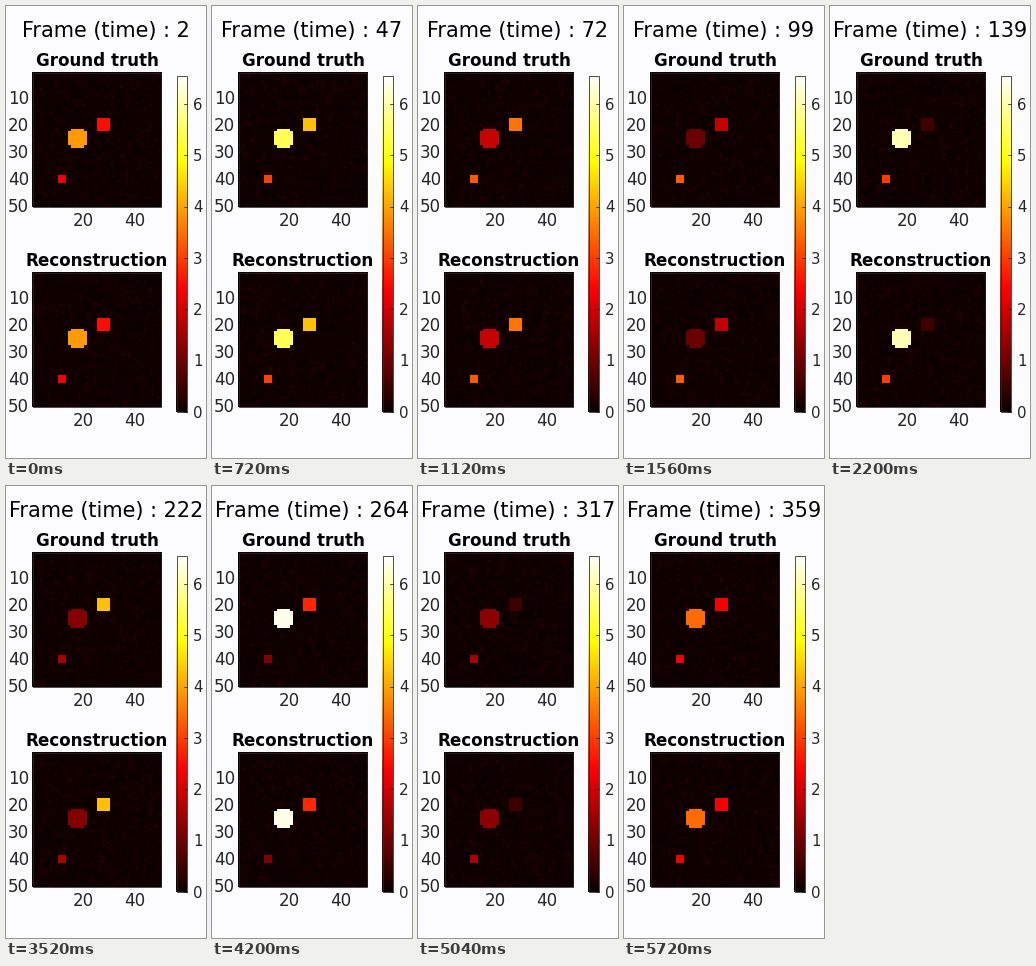
These frames come from a looping animation (200x452 px, 5760 ms). A matplotlib script:

```python
import numpy as np
import matplotlib.pyplot as plt
from matplotlib.animation import FuncAnimation
from matplotlib.patches import Rectangle

W, H, DPI = 200, 452, 64
FRAMES, INTERVAL = 144, 40
N = 50
VMAX = 6.565
INK = "#262626"
LEFT, WIDTH, HEIGHT = 26, 129.5, 135
PANELS = [("Ground truth", 66), ("Reconstruction", 266)]
BAR_X, BAR_TOP, BAR_W, BAR_H = 170, 69, 11, 337

plt.rcParams["font.family"] = "DejaVu Sans"
fig = plt.figure(figsize=(W / DPI, H / DPI), dpi=DPI, facecolor="#fcfcfe")
ax = fig.add_axes([0, 0, 1, 1])
ax.axis("off")


def px(size):
    return size * 72 / DPI


def label(x, y, text, size=16.7, ha="center", **kw):
    return ax.text(x, y, text, fontsize=px(size), ha=ha, va="baseline", **kw)


def heat(data, x, y, w, h):
    return ax.imshow(data, cmap="hot", vmin=0, vmax=VMAX, aspect="auto",
                     interpolation="nearest", extent=(x, x + w, y + h, y))


def frame(x, y, w, h):
    ax.add_patch(Rectangle((x + 0.5, y + 0.5), w - 1, h - 1, fill=False,
                           ec=INK, lw=px(0.8)))


row, col = np.mgrid[1:N + 1, 1:N + 1]
disc = (col - 18) ** 2 + (row - 25) ** 2 <= 13
block = (abs(col - 28) <= 2) & (abs(row - 20) <= 2)
dot = (abs(col - 12) <= 1) & (abs(row - 40) <= 1)


def scene(t):
    """Three sources pulsing at one, two and three cycles per loop."""
    a = np.radians(t)
    return (disc * (3.6 + 2.95 * np.sin(3 * a))
            + block * (2.4 + 1.9 * np.sin(2 * a))
            + dot * (2.27 + 1.05 * np.sin(a)))


def noisy(signal, rng):
    return np.maximum(signal, np.abs(rng.normal(0, 0.09, (N, N))))


images = []
for name, top in PANELS:
    images.append(heat(np.zeros((N, N)), LEFT, top, WIDTH, HEIGHT))
    frame(LEFT, top, WIDTH, HEIGHT)
    label(91, top - 6, name, weight="bold", color="black")
    for v in range(10, N + 1, 10):
        label(23, top + (v - 0.5) * HEIGHT / N + 6.2, str(v), ha="right", color=INK)
    for v in (20, 40):
        label(LEFT + (v - 0.5) * WIDTH / N + 0.5, top + 154, str(v), color=INK)

heat(np.linspace(VMAX, 0, 256)[:, None], BAR_X, BAR_TOP, BAR_W, BAR_H)
frame(BAR_X, BAR_TOP, BAR_W, BAR_H)
for v in range(7):
    y = BAR_TOP + BAR_H * (1 - v / VMAX)
    ax.plot([BAR_X + BAR_W - 3, BAR_X + BAR_W], [y, y], color=INK, lw=px(0.8))
    label(187, y + 5.5, str(v), size=15, ha="left", color=INK)

title = label(99.8, 31, "", size=20.8, color="black")
ax.set_xlim(0, W)
ax.set_ylim(H, 0)


def update(i):
    t = int(2 + 2.5 * i)
    rng = np.random.default_rng(i)
    signal = scene(t)
    for im in images:
        im.set_data(noisy(signal, rng))
    title.set_text(f"Frame (time) : {t}")
    return [*images, title]


anim = FuncAnimation(fig, update, frames=FRAMES, interval=INTERVAL,
                     repeat=True, repeat_delay=0)
plt.show()
```
